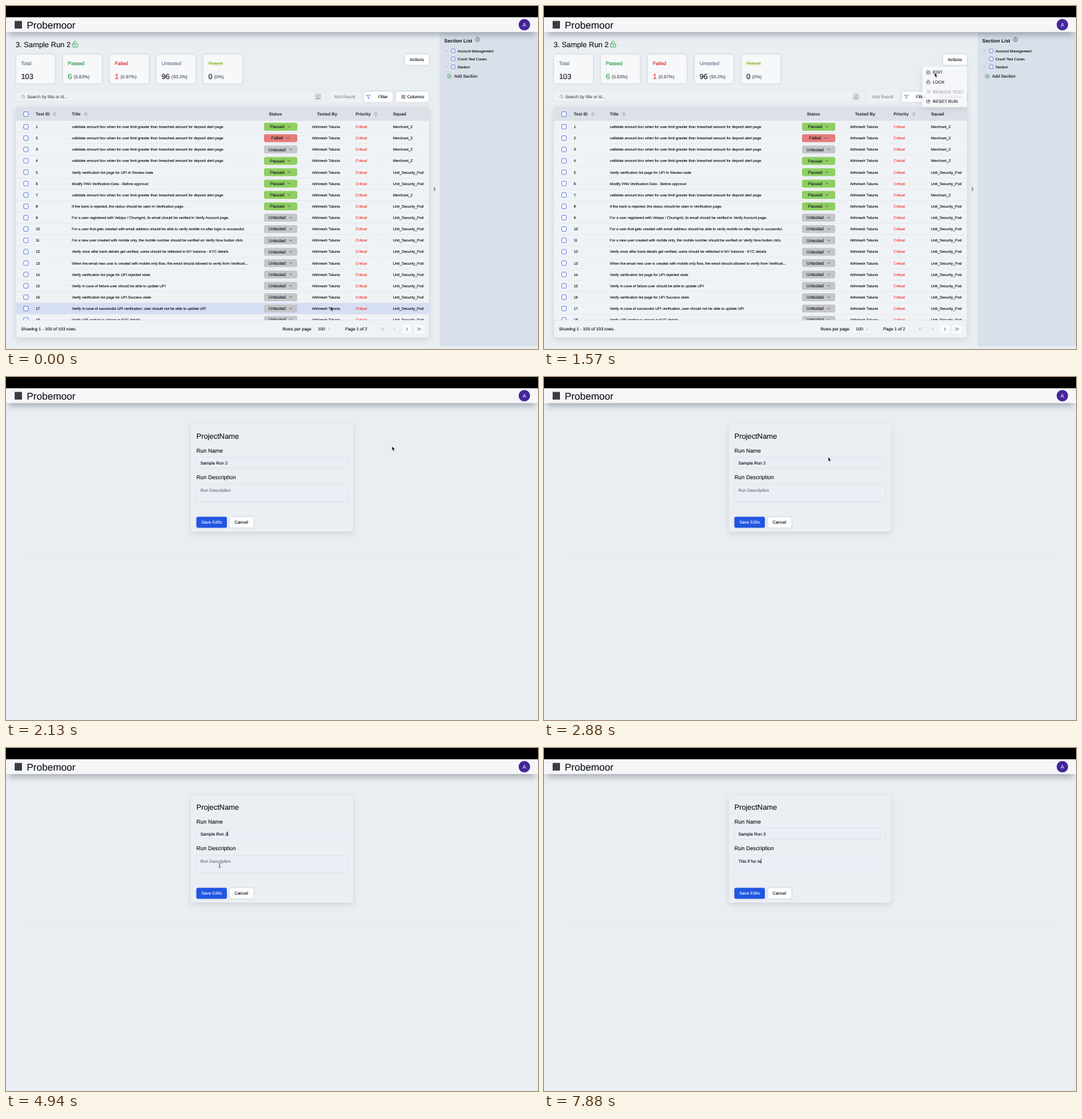
Animation of 800x517 px, one loop 8000 ms. Source, as an HTML page:

```html
<!DOCTYPE html>
<html lang="en">
<head>
<meta charset="utf-8">
<title>Test run</title>
<style>
  html, body { margin: 0; width: 100%; height: 100%; overflow: hidden; background: #e9eef2; }
  svg { display: block; width: 100vw; height: 100vh; }
  text { font-family: "Liberation Sans", Arial, sans-serif; white-space: pre; text-rendering: geometricPrecision; }
  .card { filter: drop-shadow(0 .6px .9px rgba(30, 40, 70, .2)); }
  .panel { filter: drop-shadow(0 3px 4px rgba(30, 40, 70, .13)); }
</style>
</head>
<body>
<svg id="stage" viewBox="0 0 800 517" preserveAspectRatio="none">
  <defs>
    <clipPath id="rows"><rect x="15" y="152" width="621" height="321.5"/></clipPath>
    <filter id="blur" x="-5%" y="-100%" width="110%" height="300%"><feGaussianBlur stdDeviation="5"/></filter>
  </defs>
</svg>
<script>
const LOOP = 8000;
const stage = document.getElementById('stage');
const INK = '#0c0e14', BLUE = '#5c7fe0', RED = '#e5322d', GREEN = '#2b9a40';
const XS = 5.556, SM = 6.48, MD = 7.41, LG = 8.33, XL = 11.11;

function el(parent, tag, attrs = {}) {
  const node = document.createElementNS('http://www.w3.org/2000/svg', tag);
  for (const k in attrs) node.setAttribute(k, attrs[k]);
  return parent.appendChild(node);
}
const group = (parent, attrs) => el(parent, 'g', attrs);
const box = (parent, x, y, width, height, rx, fill, more = {}) =>
  el(parent, 'rect', { x, y, width, height, rx, fill, ...more });
// y is the middle of the capitals
function label(parent, x, y, str, size, fill = INK, more = {}) {
  const node = el(parent, 'text', {
    x, y: y + size * .36, 'font-size': size, fill, stroke: fill, 'stroke-width': .1, ...more
  });
  node.textContent = str;
  return node;
}
// icons live in a 24 x 24 grid
function icon(parent, name, cx, cy, size, color = INK, weight = 2) {
  const k = size / 24;
  return el(parent, 'path', {
    d: ICONS[name], fill: 'none', stroke: color, 'stroke-width': weight,
    'stroke-linecap': 'round', 'stroke-linejoin': 'round',
    transform: `translate(${cx - size / 2} ${cy - size / 2}) scale(${k})`
  });
}
const BODY = 'M5 11h14a2 2 0 0 1 2 2v7a2 2 0 0 1-2 2H5a2 2 0 0 1-2-2v-7a2 2 0 0 1 2-2z';
const ICONS = {
  down: 'M6 9l6 6 6-6',
  right: 'M9 6l6 6-6 6',
  left: 'M15 6l-6 6 6 6',
  first: 'M11 6l-6 6 6 6M19 6l-6 6 6 6',
  last: 'M13 6l6 6-6 6M5 6l6 6-6 6',
  sort: 'M6 15l6 6 6-6M6 9l6-6 6 6',
  search: 'M11 3a8 8 0 1 0 .01 0M21 21l-4.3-4.3',
  funnel: 'M2 3h20l-8 10v8l-4-2v-6z',
  sliders: 'M2 5h9M16 5h6M2 12h3M10 12h12M2 19h11M18 19h4M13 3v4M8 10v4M16 17v4',
  open: BODY + 'M7 11V7a5 5 0 0 1 9.9-1M12 15v3',
  lock: BODY + 'M7 11V7a5 5 0 0 1 10 0v4',
  edit: 'M12 3H5a2 2 0 0 0-2 2v14a2 2 0 0 0 2 2h14a2 2 0 0 0 2-2v-7M18 3l3 3-9 9-4 1 1-4z',
  remove: 'M8 5h13v14H8l-6-7zM12 9l6 6M18 9l-6 6',
  reset: 'M3 4v16M8 4h6M8 12h12M8 20h12M20 12a5 5 0 0 0-10 0M18 4l3 3-3 3',
  plus: 'M12 2a10 10 0 1 0 .01 0M7 12h10M12 7v10',
  info: 'M12 2a10 10 0 1 0 .01 0M12 11v6M12 7v.5'
};
const check = (parent, cx, cy, s) =>
  box(parent, cx - s / 2, cy - s / 2, s, s, s * .22, '#f3f6fc', { stroke: BLUE, 'stroke-width': .9 });
const button = (parent, x, y, w, h) =>
  box(parent, x, y, w, h, 2.5, '#fdfdfe', { stroke: '#e0e4ea', 'stroke-width': .5, class: 'card' });

/* ---------- list page ---------- */
const list = group(stage);
box(list, 652, 39, 148, 474, 0, '#dae0ea');
box(list, 643, 273, 2.6, 6, .8, '#a2a6ad');
label(list, 14.5, 58, '3. Sample Run 2', XL);
icon(list, 'open', 104, 57.5, 10.5, '#35ad4c', 2.2);

const stats = [
  ['Total', '#727889', '103', INK, ''],
  ['Passed', GREEN, '6', GREEN, '(5.83%)'],
  ['Failed', RED, '1', RED, '(0.97%)'],
  ['Untested', '#7b8299', '96', INK, '(93.2%)'],
  ['Retest', '#b3c944', '0', INK, '(0%)']
];
stats.forEach(([name, tint, count, ink, share], i) => {
  const x = 15 + i * 70.4;
  box(list, x, 73, 59, 44, 4, '#f6f8fa', { stroke: '#dfe4ea', 'stroke-width': .5, class: 'card' });
  label(list, x + 7.7, 86, name, MD, tint, { 'stroke-width': .2 });
  if (name === 'Retest') box(list, x + 8, 86, 21.5, .8, 0, '#7dbb49');
  label(list, x + 7.7, 106.5, count, XL, ink);
  label(list, x + 10.3 + count.length * 6.18, 107, share, 6.85, '#4b5160');
});
button(list, 600, 73, 36, 16);
label(list, 607.3, 81, 'Actions', SM);

box(list, 15, 129, 466, 15, 3, '#eff1f5', { stroke: '#dfe3e9', 'stroke-width': .6 });
icon(list, 'search', 26, 136.5, 6, '#5a606c');
label(list, 31.7, 136.5, 'Search by title or id...', SM, '#4a4f5e');
box(list, 464, 131.5, 10.5, 10, 1.5, '#d4d7dd');
el(list, 'path', { d: 'M466.5 139.5h5.5M468.5 137.5l2-3.5', stroke: '#747985', 'stroke-width': .7 });
box(list, 486, 129, 47, 16, 2.5, '#eef1f4');
label(list, 493.5, 137, 'Add Result', SM, '#868a92');
button(list, 538, 129, 44, 16);
icon(list, 'funnel', 545, 137, 7, '#3558d8');
label(list, 559.7, 137, 'Filter', SM);
button(list, 586, 129, 50, 16);
icon(list, 'sliders', 597.5, 137, 7);
label(list, 603.3, 137, 'Columns', SM);

box(list, 15, 152.5, 621, 347.5, 4, '#f0f3f6', { stroke: '#d5dae1', 'stroke-width': .6, class: 'panel' });
const table = group(list, { 'clip-path': 'url(#rows)' });
box(table, 15, 152.5, 621, 40, 4, '#dce0e7');
box(table, 15, 173, 621, 310, 0, '#f0f3f6');
const hover = box(table, 15, 447.5, 621, 17, 0, '#d6def3');

check(table, 30, 163, 7);
[['Test ID', 44.7, 73.3], ['Title', 99, 120], ['Status', 395.3], ['Tested By', 467.7],
 ['Priority', 525.7, 556], ['Squad', 582]].forEach(([name, x, sort]) => {
  label(table, x, 163, name, SM, '#20242e', { 'font-weight': 700, 'stroke-width': 0 });
  if (sort) icon(table, 'sort', sort, 163, 6.3, '#3b404b');
});

const PITCH = 17.125, FIRST = 182;
const deposit = 'valitdate amount box when for user limit greater than breached amount for deposit alert page';
const titles = [
  deposit, deposit, deposit, deposit,
  'Verify verification list page for UPI In Review state',
  'Modify PAN Verification Data - Before approval',
  deposit,
  'If the bank is rejected, the status should be seen in Verification page.',
  'For a user registered with Velopa / Chumgrid, its email should be verified in Verify Account page.',
  'For a user that gets created with email address should be able to verify mobile no after login is successful.',
  'For a new user created with mobile only, the mobile number should be verified on Verify Now button click.',
  'Verify once after bank details get verified, same should be reflected in MY balance - KYC details',
  'When the email new user is created with mobile only flow, the email should allowed to verify from Verificati...',
  'Verify verification list page for UPI rejected state',
  'Verify in case of failure user should be able to update UPI',
  'Verify verification list page for UPI Success state',
  'Verify in case of successful UPI verification, user should not be able to update UPI',
  'Verify UPI section is shown in KYC details'
];
const STATUS = {
  Passed: ['#8fcf62', 397, 425.5],
  Failed: ['#e47c7b', 399, 423.7],
  Untested: ['#c4c6ca', 394.8, 428]
};
titles.forEach((title, i) => {
  const y = FIRST + i * PITCH;
  const status = i === 1 ? 'Failed' : i < 8 && i !== 2 ? 'Passed' : 'Untested';
  const [tint, tx, cx] = STATUS[status];
  box(table, 15, y + 8.4, 621, .5, 0, '#dadfe5');
  check(table, 30, y, 7);
  label(table, 44.7, y, i + 1, XS);
  label(table, 99, y, title, XS);
  box(table, 388, y - 6, 50, 12, 2.6, tint);
  label(table, tx, y, status, SM, '#14171c');
  icon(table, 'down', cx, y, 7, '#14171c');
  label(table, 460.3, y, 'Abhinesh Talunia', XS);
  label(table, 525.8, y, 'Critical', XS, RED);
  label(table, 582, y, i < 4 || i === 6 ? 'Merchant_Z' : 'Unit_Security_Pod', XS);
});

box(list, 15, 473.3, 621, .5, 0, '#d5dae1');
label(list, 22.5, 487, 'Showing 1 - 100 of 103 rows.', SM);
label(list, 415.7, 487, 'Rows per page', SM);
box(list, 464, 479.5, 30, 15, 2.5, '#f2f4f7', { stroke: '#e0e4e9', 'stroke-width': .5 });
label(list, 469, 487, '100', SM);
icon(list, 'sort', 486, 487, 5.5, '#8b909a');
label(list, 510, 487, 'Page 1 of 2', SM);
['first', 'left', 'right', 'last'].forEach((name, i) => {
  const x = 566 + i * 18.4;
  box(list, x - 7.3, 479.7, 14.6, 14.6, 2.5, i < 2 ? '#f1f4f7' : '#fafbfc', { stroke: '#e0e4e9', 'stroke-width': .5 });
  icon(list, name, x, 487, 8, i < 2 ? '#9a9ea7' : INK);
});

label(list, 659, 52, 'Section List', MD, INK, { 'font-weight': 700, 'stroke-width': 0 });
icon(list, 'info', 709, 50.5, 7.5, '#22262e');
['Account Management', 'Crash Test Cases', 'Section'].forEach((name, i) => {
  const y = 67.6 + i * 12;
  if (i !== 1) icon(list, 'right', 662, y, 6, '#777d88');
  check(list, 672.6, y, 5.3);
  label(list, 679, y, name, XS);
});
icon(list, 'plus', 666.7, 106, 7.5, GREEN);
label(list, 674, 106, 'Add Section', SM);

const menu = group(list);
box(menu, 569, 91.5, 67, 61, 3, '#fafbfc', { 'fill-opacity': .88, class: 'panel' });
[['EDIT', 'edit'], ['LOCK', 'lock'], ['REMOVE TEST', 'remove'], ['RESET RUN', 'reset']].forEach(([name, pic], i) => {
  const y = 100 + i * 14.6, ink = i === 2 ? '#a3a7ae' : '#1a1d24';
  icon(menu, pic, 578, y, 6.6, ink);
  label(menu, 584.6, y, name, SM, ink);
});

/* ---------- edit page ---------- */
const form = group(stage);
box(form, 35, 269.7, 731, .6, 0, '#dfe4e9');
box(form, 278, 72, 244, 161, 3, '#ebeff4', { class: 'panel' });
label(form, 286.3, 89.5, 'ProjectName', XL);
label(form, 286.3, 111, 'Run Name', LG);
label(form, 286.3, 151.5, 'Run Description', LG);
const field = (y, h) => box(form, 286.4, y, 227.2, h, 2, '#ebeef4', { stroke: '#d3d8e0', 'stroke-width': .6 });
const nameBox = field(121, 16.8), noteBox = field(162, 26.2);
const nameText = label(form, 292.3, 129.6, '', SM);
const hint = label(form, 292.3, 170.5, 'Run Description', SM, '#666c80');
const noteText = label(form, 292.3, 170.5, '', SM);
const caret = box(form, 0, 0, .7, 7.4, 0, '#10131a');
box(form, 286.3, 210.8, 45.8, 16.4, 2.5, '#2056e2', { class: 'card' });
label(form, 293.7, 219, 'Save Edits', SM, '#f4f7ff');
button(form, 336.3, 211, 36, 16);
label(form, 343.8, 219, 'Cancel', SM);

/* ---------- top bar ---------- */
box(stage, 4, 30, 792, 14, 0, '#4a5263', { filter: 'url(#blur)', opacity: .42 });
box(stage, 0, 17, 800, 22.3, 0, '#f6f6f9');
box(stage, 0, 0, 800, 17, 0, '#000');
box(stage, 13, 22.5, 11, 11.5, 0, '#3a3c40');
label(stage, 31.2, 28.2, 'Probemoor', 14.81);
el(stage, 'circle', { cx: 779.5, cy: 28.2, r: 8.6, fill: '#45259b' });
label(stage, 779.5, 28.4, 'A', MD, '#f3effc', { 'text-anchor': 'middle' });

/* ---------- pointer ---------- */
const arrow = el(stage, 'path', {
  d: 'M0 0V6.3L1.4 5L2.5 7.4L3.5 6.9L2.5 4.7H4.4Z', fill: '#000', stroke: '#fff', 'stroke-width': .4
});
const beam = el(stage, 'path', {
  d: 'M-1.5-3.2Q0-3.2 0-2.2Q0-3.2 1.5-3.2M0-2.2V2.2M-1.5 3.2Q0 3.2 0 2.2Q0 3.2 1.5 3.2M-.8 .9H.8',
  fill: 'none', stroke: '#15181f', 'stroke-width': .6
});

/* ---------- timing ---------- */
const PATH = [
  [0, 488, 453], [70, 488, 453], [820, 615, 80.5], [1150, 615, 80.5], [1600, 587, 101],
  [1900, 586, 102], [2070, 584, 103], [2130, 580.5, 104.5], [2500, 580, 105],
  [3150, 337, 130], [4320, 337, 130], [4920, 321.3, 177], [LOOP, 321.3, 177]
];
const MENU = [880, 1820], FORM = 2130;
const NAMES = [[0, 'Sample Run 2'], [3500, 'Sample Run '], [3880, 'Sample Run 3']];
const NOTE = 'This if for re';
const KEYS = [5500, 5630, 5690, 5820, 5880, 6070, 6250, 6320, 6500, 6630, 6760, 6880, 7570, 7760];
const NAME_FOCUS = 3250, NOTE_FOCUS = 5130;
const NAME_CARET = [[3250, 3690], [3880, 4380], [4880, 5130]];

const within = (t, [a, b]) => t >= a && t < b;
const show = (node, on) => node.setAttribute('visibility', on ? 'inherit' : 'hidden');

function pointerAt(t) {
  let i = 0;
  while (i < PATH.length - 2 && t >= PATH[i + 1][0]) i++;
  const [t0, x0, y0] = PATH[i], [t1, x1, y1] = PATH[i + 1];
  const p = Math.min(1, (t - t0) / (t1 - t0)), e = p * p * (3 - 2 * p);
  return [x0 + (x1 - x0) * e, y0 + (y1 - y0) * e];
}

function draw(t) {
  const editing = t >= FORM;
  const [x, y] = pointerAt(t);
  show(list, !editing);
  show(form, editing);
  show(menu, within(t, MENU));

  const row = Math.round((y - FIRST) / PITCH);
  show(hover, x < 636 && row >= 0 && y < 473);
  hover.setAttribute('y', FIRST + row * PITCH - 8.5);

  const seen = !within(t, [3500, 4320]) && t < 5500;
  const overField = editing && x > 286 && x < 514 && (within(y, [121, 138]) || within(y, [162, 188]));
  show(arrow, seen && !overField);
  show(beam, seen && overField);
  for (const p of [arrow, beam]) p.setAttribute('transform', `translate(${x} ${y})`);
  if (!editing) return;

  const inNote = t >= NOTE_FOCUS;
  nameText.textContent = NAMES.filter(n => t >= n[0]).pop()[1];
  noteText.textContent = NOTE.slice(0, KEYS.filter(k => t >= k).length);
  show(hint, t < KEYS[0]);
  nameBox.setAttribute('stroke-opacity', t >= NAME_FOCUS && !inNote ? .45 : 1);
  noteBox.setAttribute('stroke-opacity', inNote ? .45 : 1);

  const text = inNote ? noteText : nameText;
  const len = text.textContent ? text.getComputedTextLength() : 0;
  show(caret, inNote || NAME_CARET.some(r => within(t, r)));
  caret.setAttribute('x', 292.2 + len);
  caret.setAttribute('y', inNote ? 166.7 : 125.8);
}

const start = performance.now();
function tick() {
  draw((performance.now() - start) % LOOP);
  requestAnimationFrame(tick);
}
tick();
</script>
</body>
</html>
```
